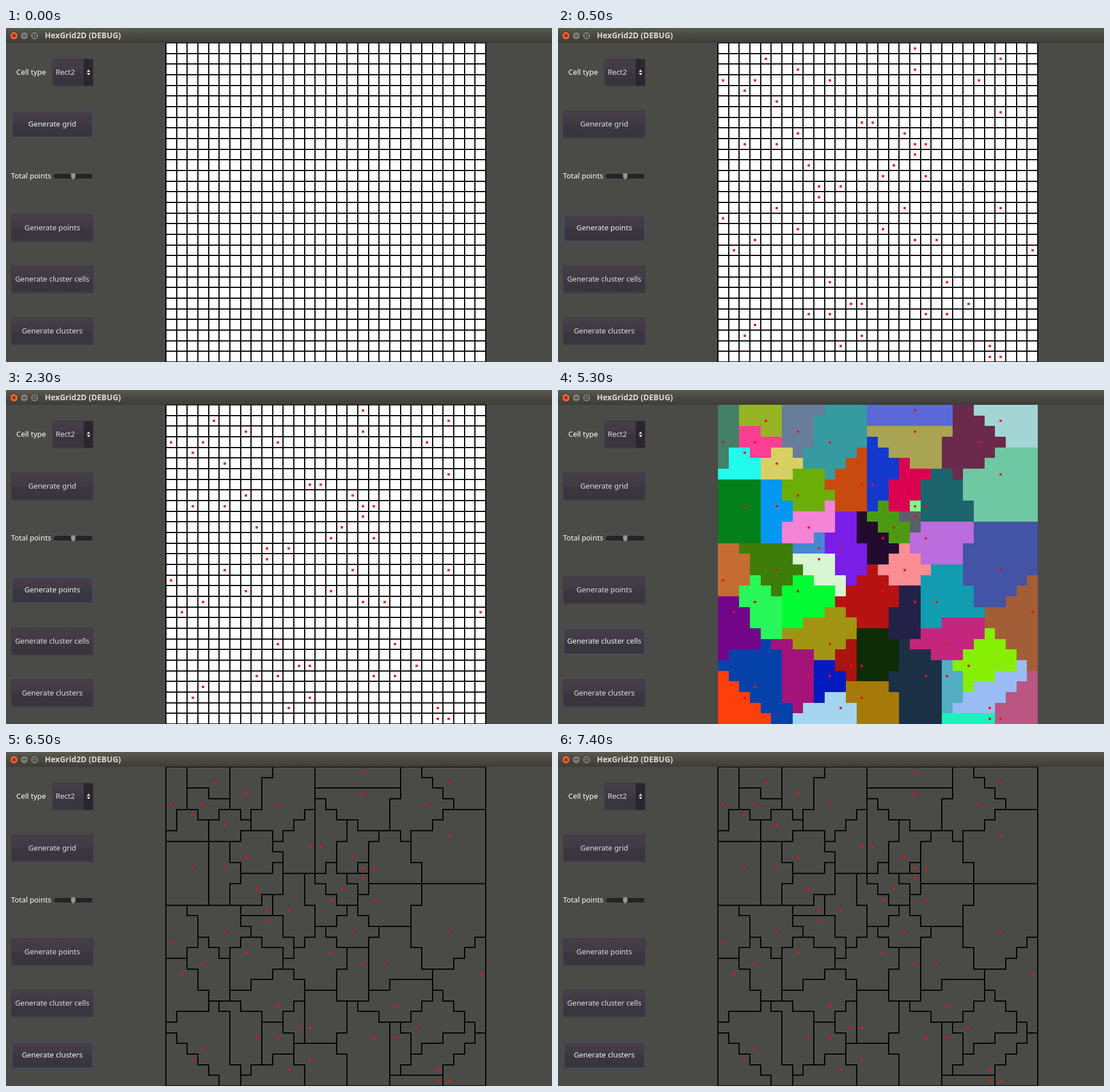
Animation, 956 px wide and 586 px high, one loop 8 s. Source, as an HTML page with a canvas:

```html
<!DOCTYPE html>
<html lang="en">
<head>
<meta charset="utf-8">
<title>HexGrid2D</title>
<style>
  html, body { margin: 0; width: 100%; height: 100%; overflow: hidden; background: #4a4a47; }
  body { position: relative; font: 12.9px "Noto Sans", "Open Sans", sans-serif; color: #fff; }
  body > * { position: absolute; box-sizing: border-box; white-space: nowrap; }
  canvas { left: 0; top: 26px; }
  .bar {
    left: 0; top: 0; width: 956px; height: 26px;
    background: linear-gradient(#5b5a51, #4c4b43 45%, #3d3c37);
    color: #dfdbd2; font-weight: bold; font-size: 13.7px; line-height: 26px; padding-left: 68px;
  }
  .bar svg { position: absolute; left: 0; top: 0; }
  .label { height: 20px; line-height: 20px; width: 88px; left: 0; text-align: center; }
  .btn {
    left: 9px; width: 144px; height: 48px; border: 1px solid #36353a; border-radius: 3px;
    background: linear-gradient(#463e49, #403a45 48%, #3a3640 52%, #38353e);
    box-shadow: inset 0 0 0 1px #454049; color: #e0e0e0;
    text-align: center; line-height: 44px;
  }
  .btn.on { border-color: #3f4a55; box-shadow: inset 0 0 0 1px #455a68; color: #f4f4f4; }
  .pick { left: 81px; top: 54px; width: 72px; text-align: left; padding-left: 5px; }
  .widgets { left: 0; top: 0; }
</style>
</head>
<body>
<canvas id="view" width="956" height="560"></canvas>
<div class="bar">HexGrid2D (DEBUG)
  <svg width="64" height="26" fill="none">
    <circle cx="14" cy="13.5" r="7" fill="#ec6237" stroke="#35342f"/>
    <path d="M11.5 11l5 5m0-5l-5 5" stroke="#4a2415" stroke-width="1.4"/>
    <g fill="#7d7c72" stroke="#35342f"><circle cx="32" cy="13.5" r="7"/><circle cx="50" cy="13.5" r="7"/></g>
    <path d="M29 13.5h6M47.5 11h5v5h-5z" stroke="#3a3934" stroke-width="1.3"/>
  </svg>
</div>
<div class="label" style="top:67px">Cell type</div>
<div class="btn pick">Rect2</div>
<div class="label" style="top:249px">Total points</div>
<div class="btn step" style="top:145px">Generate grid</div>
<div class="btn step" style="top:327px">Generate points</div>
<div class="btn step" style="top:417px">Generate cluster cells</div>
<div class="btn step" style="top:508px">Generate clusters</div>
<svg class="widgets" width="160" height="280">
  <path d="M136 55h16v46h-16z" fill="#29272d"/>
  <path d="M141.5 77l3-4 3 4zM141.5 79l3 4 3-4z" fill="#e4e4e4"/>
  <rect x="84" y="256" width="67" height="8" rx="3.5" fill="#242328"/>
  <path d="M114 255h7.5v6.5l-3.7 5-3.8-5z" fill="#969696" stroke="#6d6d6d" stroke-width=".7"/>
</svg>
<script>
const N = 30, LEFT = 280, CELL = 560 / N, LOOP = 8000;
const STARTS = [0, 500, 3500, 6500];

// Column, row, colour; on equal distance the earlier site owns the cell.
const sites = [
  [16, 11, '4c9a14'], [14, 7, '1538cf'], [17, 8, 'dc0050'], [18, 9, '80f890'], [10, 3, '359ba0'],
  [7, 2, '687d99'], [0, 3, '447f6a'], [4, 1, '97b427'], [3, 3, 'ff3e93'], [2, 4, '22fcec'],
  [5, 9, '0397f0'], [5, 5, 'd8d063'], [18, 0, '5a68d8'], [18, 2, 'a9a453'], [24, 3, '6b2a4c'],
  [26, 1, 'a2d5d4'], [11, 13, '7a1ee8'], [13, 7, 'c84a0e'], [9, 13, '4488d4'], [19, 9, '1c656d'],
  [18, 10, '5a5f69'], [20, 18, '119cb0'], [18, 18, '242148'], [17, 15, 'fa8e92'], [21, 22, 'c4267e'],
  [26, 29, 'bb5582'], [25, 28, '9abcf4'], [23, 24, '85ee02'], [25, 29, '1cf0bc'], [19, 25, '1c3045'],
  [21, 25, '53adc4'], [13, 27, 'a67a08'], [15, 17, 'b61211'], [7, 8, '6bae08'], [8, 11, 'f583d6'],
  [5, 15, '3f7d0a'], [0, 16, 'c46c32'], [12, 24, 'aa1410'], [10, 22, 'a19412'], [7, 17, '02fc33'],
  [3, 26, '0442a9'], [3, 18, '28f75a'], [2, 27, 'ff3f0b'], [10, 25, '031ac0'], [11, 28, 'a5d5ef'],
  [8, 25, 'a4137a'], [26, 6, '6ec8a4'], [2, 9, '03801a'], [15, 12, '230b2e'], [19, 12, 'bb6cdd'],
  [9, 14, 'd8f6d3'], [26, 15, '4353a6'], [1, 19, '73058a'], [29, 19, 'a35d37'], [13, 24, '0d2c06']
];

const ctx = document.getElementById('view').getContext('2d');
const buttons = document.querySelectorAll('.step');
const px = c => Math.round(LEFT + c * CELL);
const py = r => Math.round(r * CELL);

function box(color, x0, y0, x1, y1) {
  ctx.fillStyle = color;
  ctx.fillRect(x0, y0, x1 - x0, y1 - y0);
}

function nearest(c, r) {
  let best = -1, min = Infinity;
  sites.forEach(([x, y], i) => {
    const d = (x - c) ** 2 + (y - r) ** 2;
    if (d < min) { min = d; best = i; }
  });
  return best;
}

const owner = Array.from({ length: N }, (_, r) => Array.from({ length: N }, (_, c) => nearest(c, r)));
const at = (c, r) => owner[r]?.[c] ?? -1;

// Black cell edges wherever the two neighbours differ.
function edges(differ) {
  for (let a = 0; a <= N; a++) for (let b = 0; b < N; b++) {
    if (differ(a - 1, b, a, b)) box('#000', px(a) - 1, py(b) - 1, px(a) + 1, py(b + 1) + 1);
    if (differ(b, a - 1, b, a)) box('#000', px(b) - 1, py(a) - 1, px(b + 1) + 1, py(a) + 1);
  }
}

function grid() {
  box('#fff', px(0), 0, px(N), 560);
  edges(() => true);
}

function cells() {
  owner.forEach((row, r) => row.forEach((k, c) =>
    box('#' + sites[k][2], px(c), py(r), px(c + 1), py(r + 1))));
}

function dots() {
  for (const [c, r] of sites) {
    const x = px(c + .5), y = Math.round((r + .5) * CELL + .2);
    box('#fc0d12', x - 2, y - 2, x + 2, y + 2);
  }
}

const scenes = [
  grid,
  () => { grid(); dots(); },
  () => { cells(); dots(); },
  () => { edges((c, r, c2, r2) => at(c, r) !== at(c2, r2)); dots(); }
];

let shown = -1;
function tick() {
  const t = performance.now() % LOOP;
  const step = STARTS.filter(s => s <= t).length - 1;
  if (step !== shown) {
    shown = step;
    ctx.clearRect(0, 0, 956, 560);
    scenes[step]();
    buttons.forEach((b, i) => b.classList.toggle('on', i === step));
  }
  requestAnimationFrame(tick);
}
tick();
</script>
</body>
</html>
```
